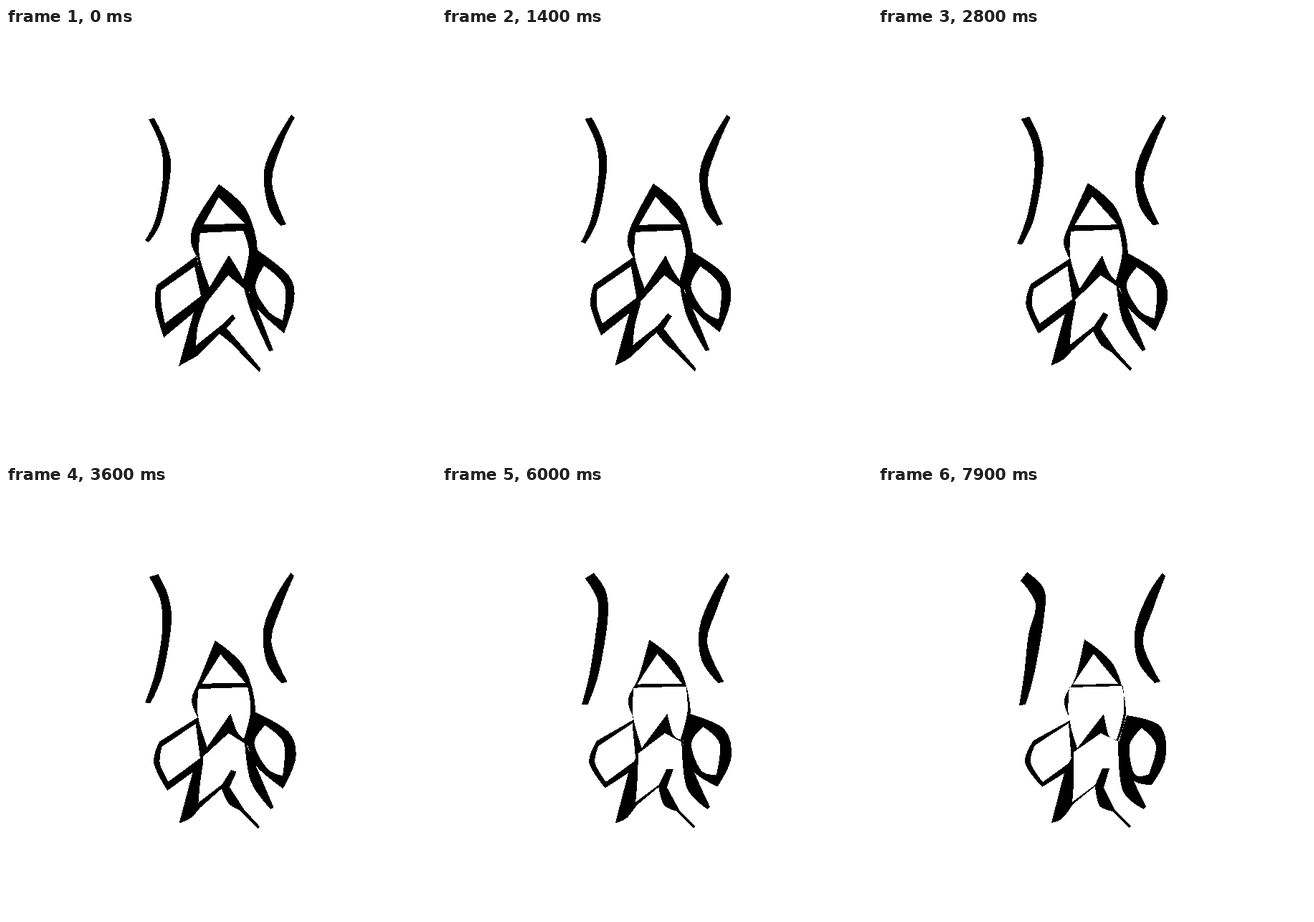
An HTML page that plays this animation: 600x600 px, repeating every 8000 ms.

```html
<!DOCTYPE html>
<html lang="en">
<head>
<meta charset="utf-8">
<title>Ink rocket</title>
<style>
html, body { margin: 0; width: 100%; height: 100%; overflow: hidden; background: #fff; }
svg { display: block; width: 100%; height: 100%; }
</style>
</head>
<body>
<svg id="stage" viewBox="0 0 600 600" fill-rule="evenodd" shape-rendering="crispEdges"></svg>
<script>
const LOOP = 8000, STEP = 100, END = 7900, MIDDLE = 4800;
const stage = document.getElementById("stage");
const mix = (a, b, u) => a + (b - a) * u;

// A pose is rings split by "/"; a point with "*" is a corner, others are smooth.
const parse = pose => pose.split("/").map(ring => ring.trim().split(" ").map(s => {
  const [x, y] = s.replace("*", "").split(",").map(Number);
  return { x, y, corner: s[0] === "*" };
}));

function outline(ring) {
  const n = ring.length;
  const handle = (i, side) => {
    const p = ring[i], a = ring[(i + n - 1) % n], b = ring[(i + 1) % n];
    const k = p.corner ? 0 : side / 6;
    return `${p.x + (b.x - a.x) * k} ${p.y + (b.y - a.y) * k} `;
  };
  let d = `M${ring[0].x} ${ring[0].y}`;
  for (let i = 0; i < n; i++) {
    const j = (i + 1) % n;
    d += `C${handle(i, 1)}${handle(j, -1)}${ring[j].x} ${ring[j].y}`;
  }
  return d + "Z";
}

// Two poses morph with an ease-out; a third one is passed at MIDDLE.
function part(...poses) {
  const path = document.createElementNS("http://www.w3.org/2000/svg", "path");
  stage.append(path);
  const keys = poses.map(parse);
  return t => {
    let k = 0, u = 1 - (1 - t / END) ** 1.4;
    if (keys.length > 2) {
      k = t < MIDDLE ? 0 : 1;
      u = k ? (t - MIDDLE) / (END - MIDDLE) : t / MIDDLE;
    }
    path.setAttribute("d", keys[k].map((ring, r) => outline(ring.map((p, i) => {
      const q = keys[k + 1][r][i];
      return { x: mix(p.x, q.x, u), y: mix(p.y, q.y, u), corner: p.corner };
    }))).join(""));
  };
}

const leftTrail = part(
  "*199,127 *207,126 223,160 230,197 217,268 *199,299 *194,296 209,266 219,208 216,166",
  "*200,127 *214,122 227,150 231,190 219,262 *202,305 *194,304 207,262 217,207 216,160",
  "*199,132 *208,120 232,145 231,188 218,262 *206,305 *197,306 204,262 210,207 220,165"
);
const rightTrail = part(
  "*398,121 *403,125 386,160 371,216 *391,274 *383,276 366,250 360,200 376,158",
  "*397,121 *401,126 383,174 370,220 *394,273 *386,275 362,243 359,198 377,151"
);
const body = part(
  "*297,218 335,253 351,311 *339,370 *330,362 *310,345 *276,388 *267,320 258,298 264,270" +
  "/*297,236 *333,273 *276,274" +
  "/*271,286 *331,283 339,312 *331,351 323,336 *311,317 *284,362 270,318",
  "*288,214 329,250 346,312 *335,356 *332,355 *311,345 *272,372 *266,321 260,297 276,266" +
  "/*301,234 *335,276 *272,277" +
  "/*267,281 *342,279 343,316 *333,354 322,348 *315,318 *278,366 266,322"
);
const leftFin = part(
  "*266,318 *210,359 208,388 *220,432 *262,397 *276,374/*263,333 *216,366 217,388 *222,412 *272,374",
  "*268,327 *217,355 205,386 *229,420 *261,400 *273,374/*266,331 *219,362 213,386 *230,413 *270,384"
);
const rightFin = part(
  "*351,310 395,346 402,380 *388,426 349,390 *338,360/*360,332 389,361 *386,408 366,395 348,362",
  "*346,317 394,342 405,380 *386,421 350,392 *336,358/*362,335 387,358 *386,403 364,394 346,358",
  "*347,320 394,335 401,380 *382,417 353,408 *336,358/*368,338 388,362 *378,402 358,402 351,362"
);
const rightFlame = part(
  "*330,355 347,384 *373,450 *367,451 342,396",
  "*335,355 354,405 *374,447 *371,451 341,424"
);
const leftFlame = part(
  "*277,372 *278,387 268,415 *265,443 *300,415 *316,399 *320,405 *308,419 *333,448 " +
  "*355,475 *354,481 *326,452 313,439 *298,427 *268,457 259,462 *241,472 *262,396",
  "*273,374 *273,385 273,415 *271,441 *303,417 *313,394 *323,394 *315,421 *331,453 " +
  "*353,475 *350,477 *328,454 309,446 *303,419 *272,444 257,464 *242,470 *261,396"
);
const parts = [leftTrail, rightTrail, body, leftFin, rightFin, rightFlame, leftFlame];

function tick() {
  const t = Math.floor(performance.now() % LOOP / STEP) * STEP;
  parts.forEach(draw => draw(t));
  requestAnimationFrame(tick);
}
tick();
</script>
</body>
</html>
```
